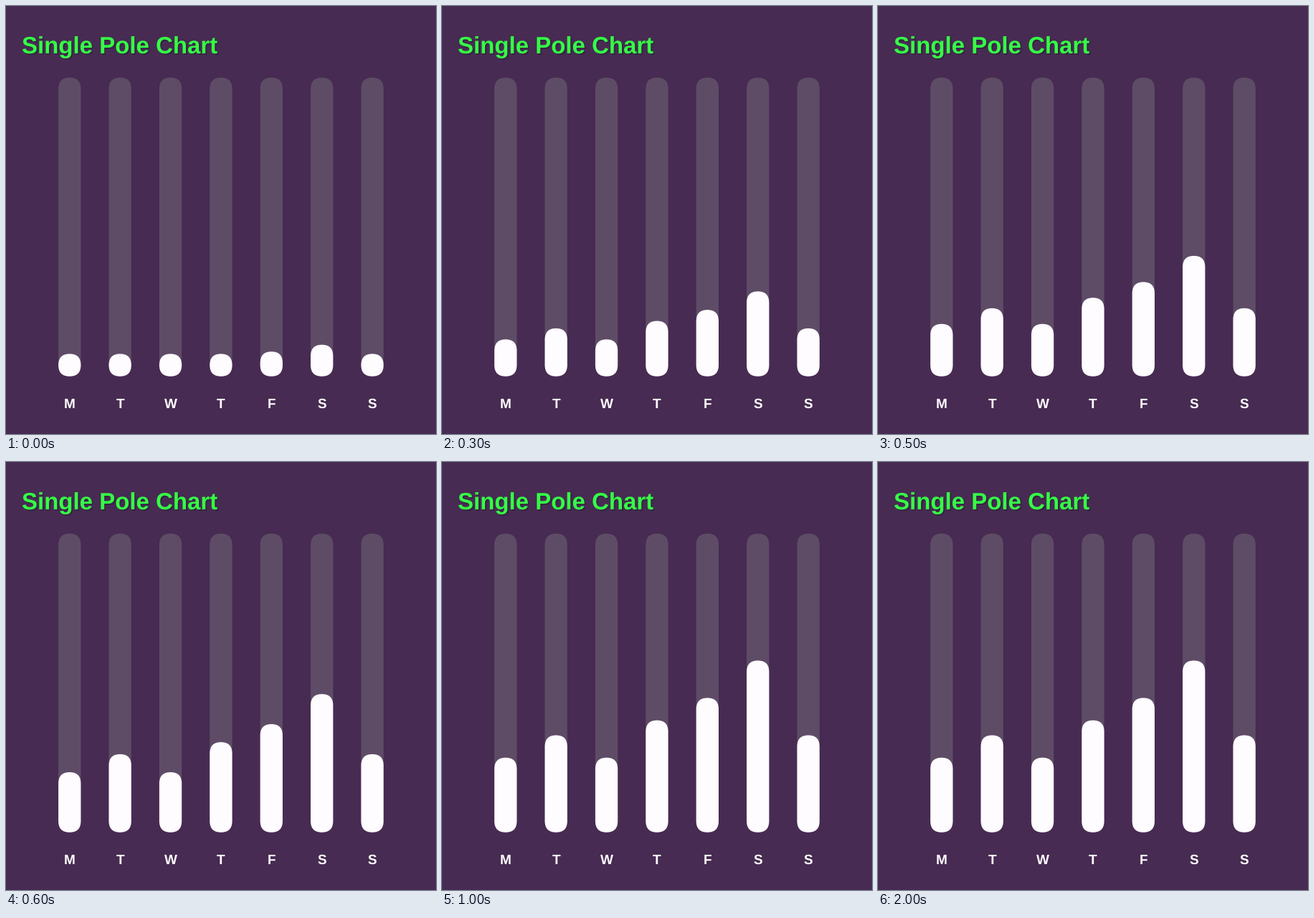
A matplotlib script for the animation above (2.1 s loop, 600x596 px).

```python
import matplotlib.pyplot as plt
from matplotlib.animation import FuncAnimation
from matplotlib.patches import FancyBboxPatch

W, H, DPI = 600, 596, 100
STEP_MS, STEPS = 100, 21

BACKGROUND = "#472b52"
TRACK = "#5e4c66"
BAR = "#fefcff"
TITLE = "#35fc46"
SHADOW = "#2b1f38"

DAYS = "MTWTFSS"
VALUES = [10, 13, 10, 15, 18, 23, 13]
FULL_SCALE = 40
FIRST_X, SPACING = 88.75, 70.4
POLE_W = 31.3
TOP, BOTTOM = 99.7, 515.7

plt.rcParams["text.hinting"] = "none"
plt.rcParams["text.hinting_factor"] = 1

fig = plt.figure(figsize=(W / DPI, H / DPI), dpi=DPI, facecolor=BACKGROUND)
ax = fig.add_axes([0, 0, 1, 1])
ax.set_xlim(0, W)
ax.set_ylim(H, 0)
ax.axis("off")


def pole(x, height, color, z):
    """Add a rounded pole standing on the chart's base line."""
    style = f"round,pad=0,rounding_size={POLE_W / 2}"
    patch = FancyBboxPatch((x - POLE_W / 2, BOTTOM - height), POLE_W, height,
                           boxstyle=style, fc=color, ec="none", lw=0, zorder=z)
    patch.set_snap(False)
    return ax.add_patch(patch)


def label(x, y, text, px, color, **kw):
    return ax.text(x, y, text, fontsize=px * 72 / DPI, color=color,
                   family="Liberation Sans", weight="bold", va="baseline", **kw)


def progress(step):
    return min(1, 0.184 + 0.1035 * step)


for dx, dy, alpha in [(1.6, 1.8, 0.45), (0.8, 1.0, 0.6)]:
    label(22 + dx, 66.3 + dy, "Single Pole Chart", 33, SHADOW, alpha=alpha)
label(22, 66.3, "Single Pole Chart", 33, TITLE)

bars = []
for i, day in enumerate(DAYS):
    x = FIRST_X + i * SPACING
    pole(x, BOTTOM - TOP, TRACK, 1)
    bars.append(pole(x, POLE_W, BAR, 2))
    label(x, 559.6, day, 19.5, BAR, ha="center")


def update(step):
    for bar, value in zip(bars, VALUES):
        height = (BOTTOM - TOP) * value / FULL_SCALE * progress(step)
        height = max(POLE_W, height)
        bar.set_y(BOTTOM - height)
        bar.set_height(height)
    return bars


anim = FuncAnimation(fig, update, frames=STEPS, interval=STEP_MS,
                     repeat=True, repeat_delay=0)
plt.show()
```
